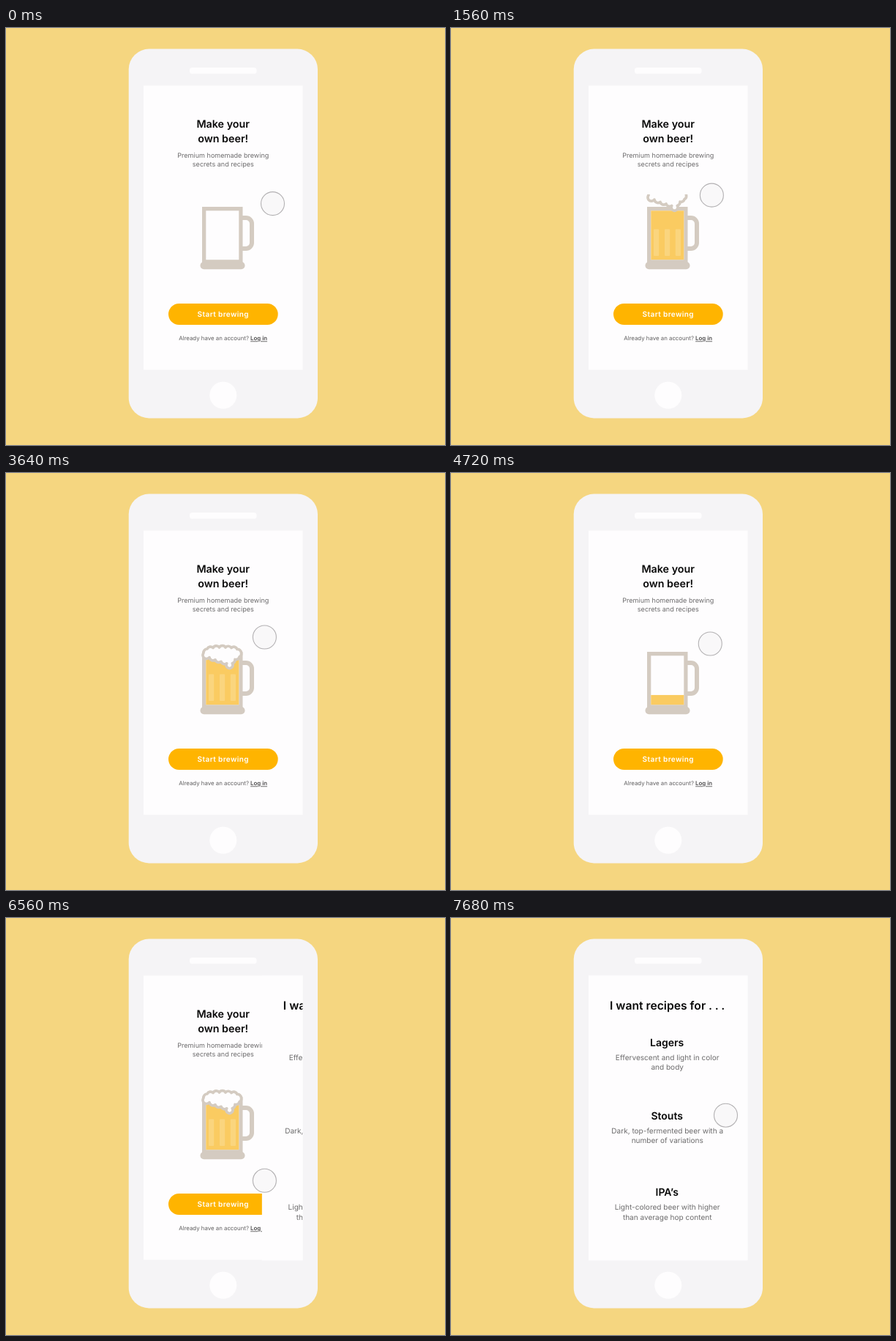
These frames come from a looping animation (600 px wide and 569 px high, 8.68 s). An HTML page:

```html
<!DOCTYPE html>
<html lang="en">
<head>
<meta charset="utf-8">
<title>Homemade brewing app</title>
<style>
  html, body { margin: 0; width: 100%; height: 100%; overflow: hidden; background: #f5d680; }
  svg { display: block; width: 100%; height: 100%; }
  text { font-family: Inter, "DejaVu Sans", sans-serif; text-anchor: middle; text-rendering: geometricPrecision; }
  .title { font-size: 14.3px; font-weight: 600; fill: #080808; }
  .lead { font-size: 9.05px; fill: #6c6b6c; }
  .button { font-size: 10px; font-weight: 600; letter-spacing: .4px; fill: #fff; }
  .login { font-size: 7.85px; fill: #605f60; }
  .link { font-weight: 600; fill: #4c4b4c; text-decoration: underline; }
  .question { font-size: 15.7px; font-weight: 600; fill: #080808; }
  .kind { font-size: 14px; font-weight: 600; fill: #080808; }
  .note { font-size: 10.05px; fill: #6c6b6c; }
</style>
</head>
<body>
<svg viewBox="0 0 600 569" preserveAspectRatio="none">
  <defs>
    <clipPath id="screenClip"><rect x="188" y="78.5" width="217.5" height="389"/></clipPath>
    <clipPath id="mugClip"><rect x="262" y="227" width="80" height="104"/></clipPath>
  </defs>

  <rect width="600" height="569" fill="#f5d680"/>
  <rect x="167.7" y="28.5" width="258.3" height="504" rx="28" fill="#f5f4f6"/>
  <rect x="251" y="54" width="91.5" height="8.5" rx="3.5" fill="#fefdfe"/>
  <circle cx="296.8" cy="501.2" r="18.5" fill="#fefdfe"/>
  <rect x="188" y="78.5" width="217.5" height="388" fill="#fefdfe"/>

  <text class="title" x="296.7" y="136.3">Make your</text>
  <text class="title" x="296.7" y="155.5">own beer!</text>
  <text class="lead" x="296.8" y="177">Premium homemade brewing</text>
  <text class="lead" x="296.8" y="189.3">secrets and recipes</text>

  <g clip-path="url(#mugClip)">
    <path d="M322 259H328a8 8 0 0 1 8 8V293a8 8 0 0 1-8 8H322" fill="none" stroke="#d4cbc1" stroke-width="6"/>
    <rect x="268" y="244" width="55.5" height="78" fill="#d4cbc1"/>
    <rect x="265.5" y="319" width="61" height="10.2" rx="5" fill="#d4cbc1"/>
    <rect x="273.3" y="249.3" width="45" height="66.9" fill="#fefdfe"/>
    <rect id="beer" x="273.3" width="45" fill="#facb61"/>
    <g id="bars" fill="#fad57e">
      <rect x="277" y="274.5" width="7.2" height="36.5" rx="1"/>
      <rect x="292" y="274.5" width="7.2" height="36.5" rx="1"/>
      <rect x="306.8" y="274.5" width="7.2" height="36.5" rx="1"/>
    </g>
    <path id="foam" fill="#fefdfe" stroke="#d4cbc1" stroke-width="3.7" stroke-linejoin="round"/>
  </g>

  <rect x="222" y="376" width="149.7" height="29" rx="14.5" fill="#ffb400"/>
  <text class="button" x="296.8" y="394.1">Start brewing</text>
  <text class="login" x="296.6" y="426.4">Already have an account? <tspan class="link">Log in</tspan></text>

  <g clip-path="url(#screenClip)">
    <g id="page">
      <rect x="188" y="78.5" width="217.5" height="389" fill="#fefdfe"/>
      <text class="question" x="295.7" y="124.6">I want recipes for . . .</text>
    </g>
  </g>

  <circle id="cursor" r="16" fill="#f9f8f9" fill-opacity=".93" stroke="#b3b1b3" stroke-width="1.1"/>
</svg>
<script>
  const LOOP = 8680, STEP = 40;
  const SVG = "http://www.w3.org/2000/svg";
  const [beer, bars, foam, page, cursor] =
    ["beer", "bars", "foam", "page", "cursor"].map(id => document.getElementById(id));

  const part = (t, start, length) => Math.min(1, Math.max(0, (t - start) / length));
  const smooth = p => p * p * (3 - 2 * p);
  const cubic = p => p < .5 ? 4 * p ** 3 : 1 - 4 * (1 - p) ** 3;
  const drift = p => p * (.256 + p * (1.368 - .624 * p));
  const mix = (a, b, p) => a + (b - a) * p;
  const set = (el, attrs) => { for (const k in attrs) el.setAttribute(k, attrs[k]); };

  function addText(cls, x, y, text) {
    const el = document.createElementNS(SVG, "text");
    set(el, { class: cls, x, y });
    el.textContent = text;
    page.append(el);
  }

  [
    [175, "Lagers", "Effervescent and light in color", "and body"],
    [274.8, "Stouts", "Dark, top-fermented beer with a", "number of variations"],
    [379.4, "IPA’s", "Light-colored beer with higher", "than average hop content"]
  ].forEach(([y, kind, first, second]) => {
    addText("kind", 295.2, y, kind);
    addText("note", 295.7, y + 18.8, first);
    addText("note", 295.7, y + 32.3, second);
  });

  // Scalloped outline, clockwise; the drip is the one large arc.
  const lobes = [
    [275, 240], [283, 238.5], [291.5, 238], [300, 238], [308, 238.5], [316, 240.5], [321.5, 245.5],
    [319, 251], [313, 254.5], [309.3, 259.8], [301.7, 259.8, 1],
    [294, 257.3], [286, 254.8], [278, 251.5], [270, 245.5]
  ];
  foam.setAttribute("d", "M270 245.5" + lobes.map(([x, y, drip]) =>
    drip ? `A4.4 4.4 0 1 1 ${x} ${y}` : `A5 5 0 0 1 ${x} ${y}`).join("") + "Z");

  function drawMug(t) {
    const since = t < 4480 ? t - 440 : t - 4480;
    const height = 66.9 * smooth(part(since, 0, 840));
    set(beer, { y: 316.2 - height, height });
    set(bars, { opacity: part(since, 800, 200) });
    set(foam, { transform: `translate(0 ${-45 * (1 - part(since, 1000, 440)) ** 3})` });
  }

  function cursorAt(t) {
    if (t < 4480) {
      const p = drift(part(t, 440, 1440));
      return [mix(364.5, 353.4, p), mix(239.6, 224, p)];
    }
    if (t < 7300) {
      const p = part(t, 4480, 1600);
      return [353.4 + 1.9 * Math.sin(Math.PI * p), mix(224, 358.3, drift(p))];
    }
    const p = smooth(part(t, 7280, 400));
    return [mix(353.4, 375.5, p), mix(358.3, 269.2, p)];
  }

  function draw(t) {
    drawMug(t);
    set(page, { transform: `translate(${217.5 * (1 - cubic(part(t, 6240, 800)))} 0)` });
    const [cx, cy] = cursorAt(t);
    set(cursor, { cx, cy });
  }

  function tick() {
    const t = performance.now() % LOOP;
    draw(Math.floor(t / STEP) * STEP);
    requestAnimationFrame(tick);
  }
  tick();
</script>
</body>
</html>
```
